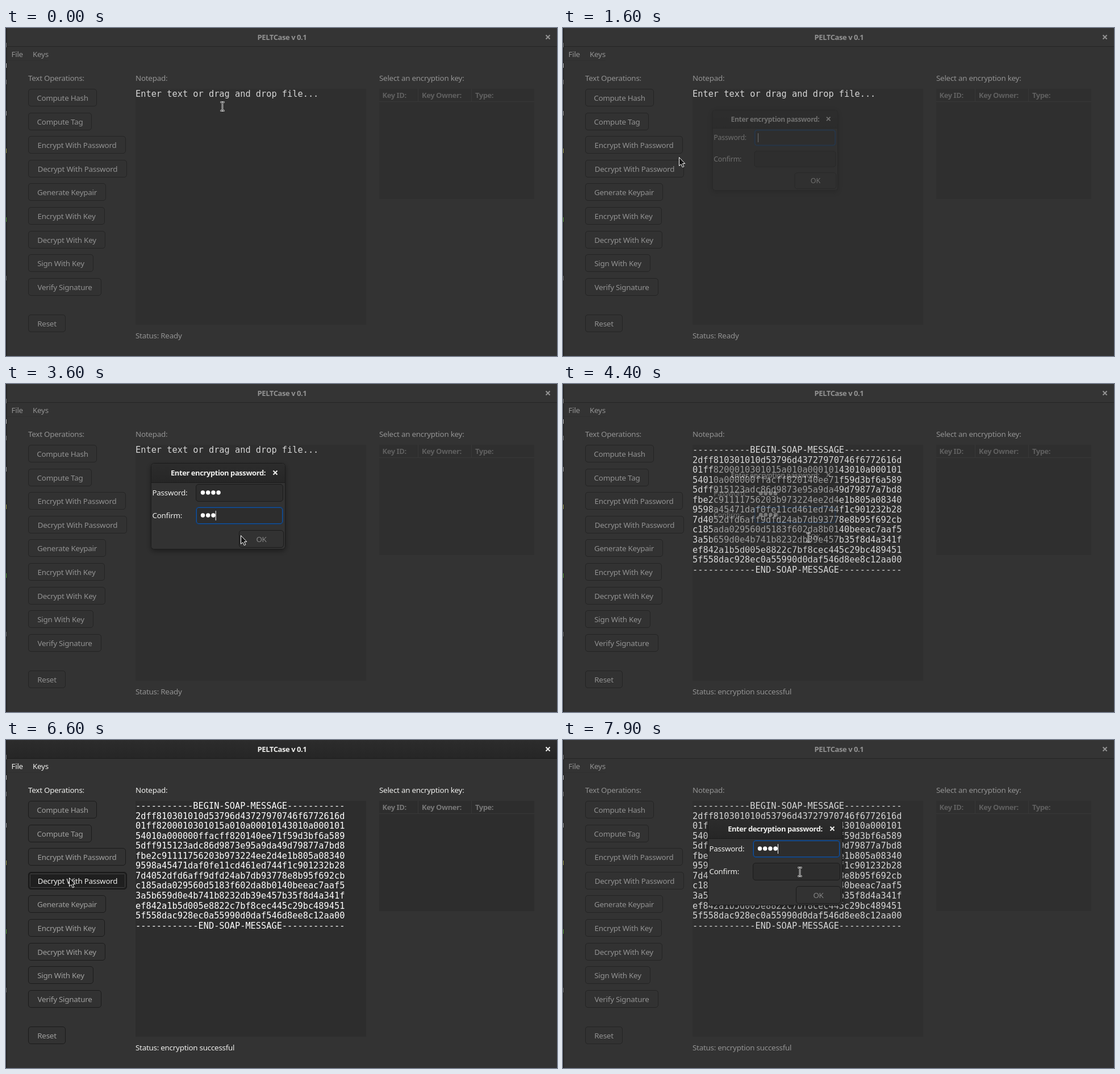
These frames come from a looping animation (970 by 577 pixels, 8000 ms). An HTML page:

```html
<!DOCTYPE html>
<html>
<head>
<meta charset="utf-8">
<style>
html, body { margin: 0; height: 100%; overflow: hidden; background: #333; }
svg {
  display: block; width: 970px; height: 577px;
  --fg: #929292; --dim: #929292; --note: #d6d6d6; --base: #2f2f2f; --line: #242424; --head: #5f5f5f; --bar: #343434;
}
svg.focus { --fg: #eeeeec; --dim: #a0a09f; --note: #fff; --base: #2d2d2d; --line: #1b1b1b; --head: #777; --bar: url(#bar); }
text { font: 13.4px "Noto Sans", sans-serif; letter-spacing: -.25px; fill: var(--fg); white-space: pre; }
.bold { font-weight: bold; font-size: 13px; letter-spacing: -.43px; }
.mid { text-anchor: middle; }
.mono { font: 15.3px "DejaVu Sans Mono", monospace; letter-spacing: 0; fill: var(--note); }
.head { fill: var(--head); }
.base { fill: var(--base); }
.rule { stroke: #383838; }
.btn rect { fill: #323232; stroke: var(--line); }
.btn text { fill: var(--dim); }
.btn .ring { fill: none; stroke: none; }
.press rect { fill: #1f1f1f; stroke: #161616; }
.press text { fill: #eeeeec; }
.press .ring { stroke: #666; stroke-dasharray: 1 1; }
.close { stroke: var(--fg); stroke-width: 2; }
#dialog { --fg: #eeeeec; --dim: #eeeeec; --line: #1b1b1b; }
#dialog.wait { --dim: #858585; }
.entry rect { fill: #2d2d2d; stroke: #1b1b1b; }
.entry .glow { fill: none; stroke: none; }
.entry.on rect { stroke: #0f3b71; }
.entry.on .glow { stroke: #15539e; }
.dots { fill: #fff; }
.caret { stroke: #fff; }
</style>
</head>
<body>
<svg id="stage" viewBox="0 0 970 577"></svg>
<script>
const LOOP = 8000;
const stage = document.getElementById('stage');
const $ = id => document.getElementById(id);

const label = (x, y, s, cls = '') => `<text x="${x}" y="${y}" class="${cls}">${s}</text>`;
const box = (x, y, w, h, attrs = '') => `<rect x="${x}" y="${y}" width="${w}" height="${h}" ${attrs}/>`;
const line = (x1, y1, x2, y2, cls) => `<path d="M${x1} ${y1}L${x2} ${y2}" class="${cls}"/>`;
const cross = (x, y) => `<path class="close" d="M${x - 3.5} ${y - 3.5}l7 7m0 -7l-7 7"/>`;
const button = (x, y, w, s, id = '') => `<g class="btn" id="${id}">
  ${box(x + .5, y + .5, w - 1, 30, 'rx="4.5"')}${box(x + 3.5, y + 3.5, w - 7, 24, 'class="ring" rx="2"')}
  ${label(x + w / 2, y + 20.5, s, 'mid')}</g>`;
const entry = (id, x, y) => `<g class="entry" id="${id}">
  ${box(x + .5, y + .5, 153, 30, 'rx="4.5"')}${box(x + 1.5, y + 1.5, 151, 28, 'class="glow" rx="3.5"')}
  <g class="dots">${[0, 1, 2, 3].map(i => `<circle cx="${x + 12.5 + i * 9.2}" cy="${y + 15}" r="3.7"/>`).join('')}</g>
  <path class="caret" d="M${x + 7.5} ${y + 7}v17"/></g>`;

const buttons = [
  ['Compute Hash', 121], ['Compute Tag', 112], ['Encrypt With Password', 172],
  ['Decrypt With Password', 174], ['Generate Keypair', 137], ['Encrypt With Key', 135],
  ['Decrypt With Key', 136], ['Sign With Key', 115], ['Verify Signature', 129]
];
const message = `-----------BEGIN-SOAP-MESSAGE-----------
2dff810301010d53796d43727970746f6772616d
01ff8200010301015a010a00010143010a000101
54010a000000ffacff820140ee71f59d3bf6a589
5dff915123adc86d9873e95a9da49d79877a7bd8
fbe2c91111756203b973224ee2d4e1b805a08340
9598a45471daf0fe11cd461ed744f1c901232b28
7d4052dfd6aff9dfd24ab7db93778e8b95f692cb
c185ada029560d5183f602da8b0140beeac7aaf5
3a5b659d0e4b741b8232db39e457b35f8d4a341f
ef842a1b5d005e8822c7bf8cec445c29bc489451
5f558dac928ec0a55990d0daf546d8ee8c12aa00
------------END-SOAP-MESSAGE------------`.split('\n');
const edgeBits = [[30, '#777'], [66, '#bbb'], [95, '#777'], [150, '#999'], [216, '#9a9a45'], [337, '#4e9a2b'], [440, '#666']];

stage.innerHTML = `
<defs>
  <linearGradient id="bar" x2="0" y2="1"><stop stop-color="#2c2c2c"/><stop offset="1" stop-color="#262626"/></linearGradient>
  <filter id="shadow" x="-20%" y="-20%" width="140%" height="150%"><feDropShadow dx="0" dy="3" stdDeviation="5" flood-opacity=".4"/></filter>
</defs>
${box(0, 0, 970, 577, 'fill="#333"')}
${box(0, 0, 970, 32, 'style="fill:var(--bar)"')}
${box(0, 32, 970, 1, 'style="fill:var(--line)"')}
${box(0, 0, 1.5, 577, 'fill="#202020"')}
${edgeBits.map(([y, c]) => box(0, y - 4, 1, 8, `fill="${c}"`)).join('')}
${label(486, 21, 'PELTCase v 0.1', 'bold mid')}${cross(954, 16)}
${label(9.5, 51, 'File')}${label(47, 51, 'Keys')}
${box(2, 57, 73, 1, 'fill="#2f2f2f"')}
${label(39, 93, 'Text Operations:')}${label(228, 93, 'Notepad:')}${label(657, 93, 'Select an encryption key:')}
${buttons.map(([s, w], i) => button(39, Math.round(107 + i * 41.6), w, s, 'btn' + i)).join('')}
${button(39, 504, 66, 'Reset')}
${box(228, 107, 406, 415, 'class="base"')}
<g id="prompt">${label(228, 121, 'Enter text or drag and drop file...', 'mono')}</g>
<g id="message">${message.map((s, i) => label(228, 121 + i * 17.55, s, 'mono')).join('')}</g>
${box(657, 107, 273, 194, 'class="base"')}
${line(657, 129.5, 930, 129.5, 'rule')}${line(725.5, 107, 725.5, 129, 'rule')}${line(819.5, 107, 819.5, 129, 'rule')}
${label(662.5, 123, 'Key ID:', 'bold head')}${label(732, 123, 'Key Owner:', 'bold head')}${label(826, 123, 'Type:', 'bold head')}
<text id="status" x="228" y="546"></text>
<g id="dialog">
  ${box(255.5, 139.5, 236, 151, 'rx="5" fill="#333" stroke="#1c1c1c" filter="url(#shadow)"')}
  <path d="M256 173v-28q0 -5 5 -5h225q5 0 5 5v28z" fill="url(#bar)"/>
  ${box(256, 173, 235, 1, 'fill="#1b1b1b"')}
  <text id="title" class="bold mid" x="373.5" y="161"></text>${cross(474, 156)}
  ${label(257.5, 196, 'Password:')}${label(257.5, 236, 'Confirm:')}
  ${entry('password', 334, 176)}${entry('confirm', 334, 216)}
  ${button(410, 257, 79, 'OK', 'ok')}
</g>
<path id="arrow" d="M.5 .5v15l3.4 -3l2.4 5.3l2.6 -1.1l-2.4 -5.2h4.3z" fill="#151515" stroke="#fff"/>
<g id="beam" fill="none"><path d="M-3.5 -7.5h2.5l1 1l1 -1h2.5M0 -6.5v13M-3.5 7.5h2.5l1 -1l1 1h2.5" stroke="#fff" stroke-width="2.6"/>
  <path d="M-3 -7.5h2l1 1l1 -1h2M0 -6.5v13M-3 7.5h2l1 -1l1 1h2" stroke="#111"/></g>`;

// pointer: time, x, y
const path = [
  [0, 381, 138], [200, 381, 138], [300, 372, 148], [500, 250, 225], [700, 92, 243], [900, 140, 224],
  [1100, 161, 216], [1200, 162, 217], [1500, 162, 217], [1900, 330, 256], [3000, 330, 256],
  [3200, 367, 233], [3400, 367, 233], [3600, 413, 266], [4000, 432, 270], [4400, 432, 270],
  [5000, 458, 363], [5500, 458, 363], [5900, 111, 240], [6100, 111, 240], [6300, 111, 242],
  [6600, 111, 242], [6900, 448, 232], [7100, 448, 232], [7300, 454, 239], [7400, 454, 239], [7900, 417, 232]
];

function pointer(t) {
  const i = path.findIndex(p => p[0] >= t);
  if (i < 1) return path[0].slice(1);
  const [a, b] = [path[i - 1], path[i]];
  const k = (t - a[0]) / (b[0] - a[0]);
  return [1, 2].map(n => Math.round(a[n] + (b[n] - a[n]) * k));
}

const ramp = (t, from, to) => Math.max(0, Math.min(1, (t - from) / (to - from)));
const within = (t, a, b) => t >= a && t < b;
const show = (el, on) => { el.style.display = on ? '' : 'none'; };

function fill(id, count, focused, caret) {
  const el = $(id);
  el.classList.toggle('on', focused);
  [...el.querySelectorAll('circle')].forEach((c, i) => show(c, i < count));
  const bar = el.querySelector('.caret');
  show(bar, focused && caret);
  bar.setAttribute('transform', `translate(${count * 9.25})`);
}

function draw(ms) {
  const t = Math.floor(ms / 100) * 100;
  const second = t >= 6600, done = t >= 4400;
  const pressing = within(t, 1400, 1600) ? 'btn2' : within(t, 6600, 6700) ? 'btn3' : '';
  stage.classList.toggle('focus', !!pressing);
  for (const id of ['btn2', 'btn3']) $(id).classList.toggle('press', id === pressing);

  show($('prompt'), !done);
  show($('message'), done);
  $('status').textContent = 'Status: ' + (done ? 'encryption successful' : 'Ready');

  const alpha = second ? ramp(t, 6600, 6900) : ramp(t, 1500, 1800) * (1 - ramp(t, 4200, 4500));
  const dialog = $('dialog'), size = .9 + .1 * alpha;
  show(dialog, alpha > 0);
  dialog.setAttribute('opacity', alpha);
  dialog.setAttribute('transform', `translate(373 215) scale(${size}) translate(-373 -215)`);
  $('title').textContent = `Enter ${second ? 'de' : 'en'}cryption password:`;

  const typed = second ? ramp(t, 7500, 7900) * 4 : ramp(t, 2600, 2800) * 4;
  const repeated = second || t < 3500 ? 0 : Math.min(4, 2 + (t - 3500) / 100);
  const onConfirm = within(t, 3400, 6600);
  fill('password', Math.round(typed), !onConfirm, !within(t, 2300, 2700));
  fill('confirm', repeated, onConfirm, true);
  dialog.classList.toggle('wait', Math.round(typed) !== repeated);
  $('ok').classList.toggle('press', within(t, 4000, 4600));

  const [x, y] = pointer(t);
  const text = alpha > .5
    ? within(x, 334, 488) && within(y, 177, 247)
    : within(x, 228, 634) && within(y, 107, 522);
  show($('beam'), text);
  show($('arrow'), !text);
  $(text ? 'beam' : 'arrow').setAttribute('transform', `translate(${x} ${y})`);
}

const start = performance.now();
function tick() {
  draw((performance.now() - start) % LOOP);
  requestAnimationFrame(tick);
}
tick();
</script>
</body>
</html>
```
